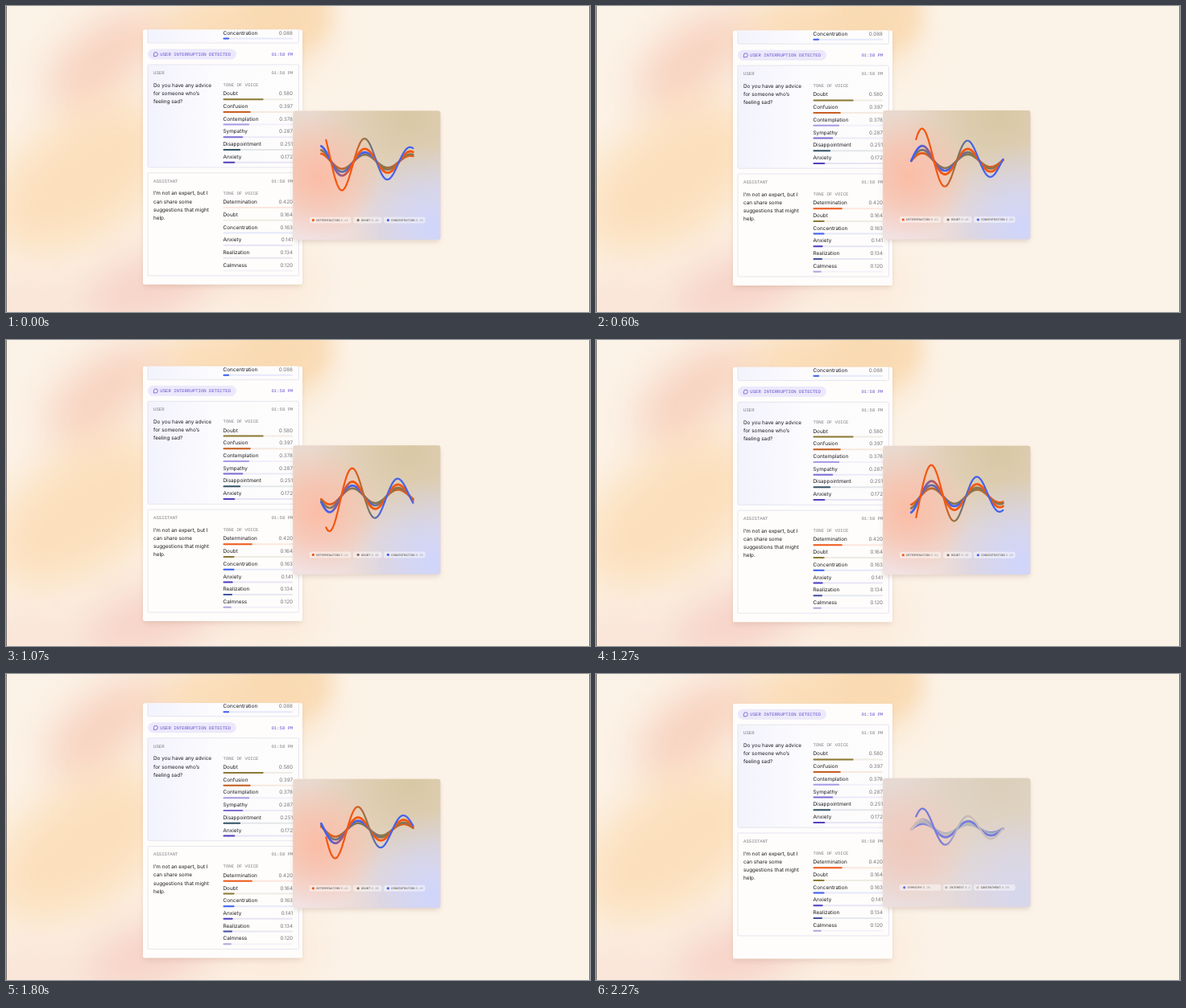
Recreate the animation shown at these times as an HTML page. Size 725 by 381 pixels, loop 2.34 s.

```html
<!DOCTYPE html>
<html lang="en">
<head>
<meta charset="utf-8">
<title>Tone of voice</title>
<style>
  html, body { margin: 0; width: 100%; height: 100%; overflow: hidden; background: #fcf3e8; }
  svg { display: block; width: 100vw; height: 100vh; }
  text { font: 400 6.4px Inter, sans-serif; fill: #1c1b1e; text-rendering: geometricPrecision; }
  .num { font-size: 6.3px; fill: #77757a; text-anchor: end; }
  .mono { font: 400 5.64px "Liberation Mono", monospace; fill: #807e85; }
  .violet { fill: #6a54cf; }
  .end { text-anchor: end; }
  .tiny { font: 400 3.76px "Liberation Mono", monospace; fill: #4a4644; }
  .pale { fill: #96908e; }
  .box { stroke: #e4e3ee; stroke-width: .9; }
  .wave path { fill: none; stroke-linecap: round; stroke-linejoin: round; }
</style>
</head>
<body>
<svg id="stage" viewBox="0 0 725 381">
  <defs>
    <filter id="blur" x="-60%" y="-60%" width="220%" height="220%"><feGaussianBlur stdDeviation="26"/></filter>
    <filter id="blurS" x="-60%" y="-60%" width="220%" height="220%"><feGaussianBlur stdDeviation="11"/></filter>
    <filter id="shade" x="-10%" y="-10%" width="120%" height="120%"><feGaussianBlur stdDeviation="3"/></filter>
    <linearGradient id="boxFill">
      <stop offset="0" stop-color="#f3f3fd"/><stop offset=".45" stop-color="#fcfbfd"/><stop offset="1" stop-color="#fefdfc"/>
    </linearGradient>
    <clipPath id="panelClip"><rect x="170" y="29.4" width="198" height="317.4" rx="2.5"/></clipPath>
  </defs>

  <rect width="725" height="381" fill="#fcf3e8"/>
  <g filter="url(#blur)">
    <ellipse cx="95" cy="215" rx="130" ry="75" fill="#fce0bd" transform="rotate(-35 95 215)"/>
    <ellipse cx="290" cy="30" rx="105" ry="55" fill="#fadcb6"/>
    <ellipse cx="120" cy="65" rx="85" ry="38" fill="#f7d0bd" transform="rotate(-38 120 65)"/>
    <ellipse cx="180" cy="350" rx="95" ry="42" fill="#f6d2c6" transform="rotate(-18 180 350)"/>
    <ellipse cx="330" cy="345" rx="60" ry="50" fill="#fbeada"/>
    <ellipse cx="20" cy="375" rx="75" ry="35" fill="#f9e2d6"/>
  </g>
  <ellipse cx="350" cy="8" rx="55" ry="48" fill="#f9d9b0" opacity=".8" filter="url(#blurS)"/>
  <path d="M.4 0V381M724.6 0V381" stroke="#57514c" stroke-width=".9"/>

  <g id="panel">
    <rect x="171" y="33" width="196" height="316" rx="3" fill="#b08a78" opacity=".28" filter="url(#shade)"/>
    <g clip-path="url(#panelClip)">
      <rect x="170" y="29" width="198" height="319" fill="#fefdfc"/>
      <g id="feed"></g>
    </g>
  </g>
  <g id="card"></g>
</svg>
<script>
const NS = 'http://www.w3.org/2000/svg';
const LOOP = 2340, STEP = 200 / 3;
const $ = id => document.getElementById(id);

function add(parent, tag, attrs = {}, text) {
  const el = parent.appendChild(document.createElementNS(NS, tag));
  for (const k in attrs) el.setAttribute(k, attrs[k]);
  if (text !== undefined) el.textContent = text;
  return el;
}
const label = (g, x, y, text, cls = '') => add(g, 'text', { x, y, class: cls }, text);

// ---- Conversation panel ----
const feed = $('feed');
const LEFT = 269.5, RIGHT = 356, SPAN = RIGHT - LEFT;

function toneRow(y, [name, value, color]) {
  label(feed, LEFT, y + 2.3, name);
  label(feed, RIGHT, y + 2.3, value.toFixed(3), 'num');
  const bar = { x: LEFT, y: y + 6.2, height: 2, rx: 1, fill: color };
  add(feed, 'rect', { ...bar, width: SPAN, opacity: .13 });
  return { el: add(feed, 'rect', { ...bar, width: SPAN * value }), full: SPAN * value };
}

function message(y, who, lines, tones) {
  add(feed, 'rect', { x: 176, y, width: 187.5, height: 128, rx: 1, class: 'box', fill: who === 'USER' ? 'url(#boxFill)' : '#fefdfb' });
  label(feed, 183, y + 11.8, who, 'mono');
  label(feed, RIGHT + .5, y + 11.8, '01:58 PM', 'mono end');
  label(feed, LEFT, y + 26.8, 'TONE OF VOICE', 'mono');
  lines.forEach((s, i) => label(feed, 183, y + 27.6 + i * 10.2, s));
  return tones.map((tone, i) => toneRow(y + 36 + i * 15.7, tone));
}

add(feed, 'rect', { x: 176, y: -40, width: 187.5, height: 86, rx: 1, class: 'box', fill: 'url(#boxFill)' });
toneRow(33.3, ['Concentration', .088, '#3f5fee']);

add(feed, 'rect', { x: 176, y: 53.5, width: 110, height: 13, rx: 6.5, fill: '#ece9fc' });
add(feed, 'path', { d: 'M183.4 62.6V60a2.5 2.5 0 1 1 2.5 2.6Z', fill: 'none', stroke: '#6a54cf', 'stroke-width': .8 });
label(feed, 191.3, 61.9, 'USER INTERRUPTION DETECTED', 'mono violet');
label(feed, RIGHT + .5, 61.9, '01:58 PM', 'mono violet end');

message(73, 'USER', ['Do you have any advice', 'for someone who\u2019s', 'feeling sad?'], [
  ['Doubt', .58, '#8b7a35'], ['Confusion', .397, '#c65f22'], ['Contemplation', .378, '#a99ce6'],
  ['Sympathy', .287, '#7c70d2'], ['Disappointment', .251, '#37566a'], ['Anxiety', .172, '#5540bd']
]);
const replyBars = message(207.8, 'ASSISTANT',
  ['I\u2019m not an expert, but I', 'can share some', 'suggestions that might', 'help.'], [
  ['Determination', .42, '#ee5a1d'], ['Doubt', .164, '#8b7a35'], ['Concentration', .163, '#3f5fee'],
  ['Anxiety', .141, '#4c3fc4'], ['Realization', .134, '#44539f'], ['Calmness', .12, '#b1a8dd']
]);

// ---- Wave card ----
const card = $('card'), defs = document.querySelector('defs');
const CARD_W = 183, CARD_H = 160.5;

function glow(id, cx, cy, r, color) {
  const g = add(defs, 'radialGradient', { id, gradientUnits: 'userSpaceOnUse', cx, cy, r });
  [[0, 1], [.45, .65], [1, 0]].forEach(([offset, o]) =>
    add(g, 'stop', { offset, 'stop-color': color, 'stop-opacity': o }));
  return `url(#${id})`;
}
const sheet = (fill, opacity = 1) =>
  add(card, 'rect', { width: CARD_W, height: CARD_H, rx: 3, fill, opacity });

add(card, 'rect', { x: 1, y: 4, width: 181, height: 159, rx: 3, fill: '#a88878', opacity: .3, filter: 'url(#shade)' });
sheet('#e9d8cd');
sheet(glow('tan', 145, 5, 120, '#d8c8a4'));
sheet(glow('lilac', 172, 145, 105, '#cfd5fb'));
sheet(glow('rose', 15, 165, 95, '#f2e2e4'));
sheet(glow('coral', 32, 82, 78, '#fbbda6'));
const veil = sheet('#e0d8d8', 0);

function palette(id, colors) {
  const g = add(defs, 'linearGradient', { id, gradientUnits: 'userSpaceOnUse', x1: 35, x2: 149 });
  [.08, .34, .5, .66, .92].forEach((offset, i) =>
    add(g, 'stop', { offset, 'stop-color': colors[i] }));
  return `url(#${id})`;
}

// Strands: start x, amplitude relative to the lead, decay per px, width
const STRANDS = [
  [35, .23, .003, 2.7],
  [35, .33, .0043, 2.7],
  [35, .45, .004, 2.8],
  [41, 1, .0083, 2.2]
];

function waveSet(prefix, [a, b, c]) {
  const g = add(card, 'g', { class: 'wave' });
  const mixes = [[a, b, b, b, a], [b, c, c, b, b], [c, a, a, a, a], [a, a, b, c, c]];
  return { g, paths: STRANDS.map((s, i) =>
    add(g, 'path', { stroke: palette(prefix + i, mixes[i]), 'stroke-width': s[3] })) };
}
const HOT = ['#f4560f', '#85764f', '#4362ee'], COOL = ['#5e70e6', '#abb3bf', '#cfbcb2'];
const sets = [waveSet('hot', HOT), waveSet('cool', COOL)];

const PILLS = [[20.5, 51.5], [74.8, 35.4], [112.6, 51.6]];
for (const [x, width] of PILLS)
  add(card, 'rect', { x, y: 132.2, width, height: 7.8, rx: 2, fill: '#fff', opacity: .45 });

function legend(items, colors) {
  const g = add(card, 'g');
  items.forEach(([x, name, value], i) => {
    add(g, 'circle', { cx: x, cy: 136.1, r: 1.6, fill: colors[i] });
    label(g, x + 3.9, 137.3, name, 'tiny');
    label(g, x + 3.9 + name.length * 2.256 + 1.3, 137.3, value, 'tiny pale');
  });
  return g;
}
const legends = [
  legend([[25, 'DETERMINATION', '0.42'], [80.8, 'DOUBT', '0.16'], [118, 'CONCENTRATION', '0.16']], HOT),
  legend([[26.5, 'SYMPATHY', '0.35'], [78.5, 'INTEREST', '0.2'], [117.5, 'CONTENTMENT', '0.20']], COOL)
];

// ---- Motion ----
const clamp = v => Math.min(1, Math.max(0, v));
const ease = v => (1 - Math.cos(Math.PI * clamp(v))) / 2;

const LEVELS = [[0, 42.5], [267, 51], [600, 43], [1067, 45.5], [1533, 46], [1800, 39.5], [2100, 37], [2267, 27], [2340, 25]];
function level(t) {
  const i = Math.max(1, LEVELS.findIndex(k => k[0] > t));
  const [t0, a] = LEVELS[i - 1], [t1, b] = LEVELS[i];
  return a + (b - a) * ease((t - t0) / (t1 - t0));
}

function strand([x0, gain, decay], amp, crest) {
  const pts = [];
  for (let x = x0; x <= 149; x += 1.5) {
    const y = 63 - amp * gain * Math.exp(-decay * (x - 41)) * Math.cos((x - crest) / 56.5 * 2 * Math.PI);
    pts.push(x.toFixed(1) + ' ' + y.toFixed(2));
  }
  return 'M' + pts.join('L');
}

function draw(t) {
  $('panel').setAttribute('transform', `translate(0 ${7.7 * ease(t / LOOP)})`);
  feed.setAttribute('transform', `translate(0 ${-17.6 * ease((t - 2000) / 280)})`);
  const grow = ease((t - 180) / 380);
  replyBars.forEach(b => b.el.setAttribute('width', b.full * grow));

  const y = 131 - Math.cos((t - 420) / 1850 * 2 * Math.PI);
  card.setAttribute('transform', `translate(356.3 ${y - .3})`);

  const amp = level(t), crest = 89.5 - t * .0674;
  STRANDS.forEach((s, i) => {
    const d = strand(s, amp, crest);
    sets.forEach(set => set.paths[i].setAttribute('d', d));
  });

  const fade = clamp((t - 2130) / 165);
  sets[0].g.setAttribute('opacity', 1 - fade);
  sets[1].g.setAttribute('opacity', fade);
  veil.setAttribute('opacity', fade * .5);
  legends[0].setAttribute('opacity', clamp(1 - fade * 2));
  legends[1].setAttribute('opacity', clamp(fade * 2 - .6));
}

const start = performance.now();
function tick() {
  const t = (performance.now() - start) % LOOP;
  draw(Math.floor((t + 5) / STEP) * STEP);
  requestAnimationFrame(tick);
}
tick();
</script>
</body>
</html>
```
